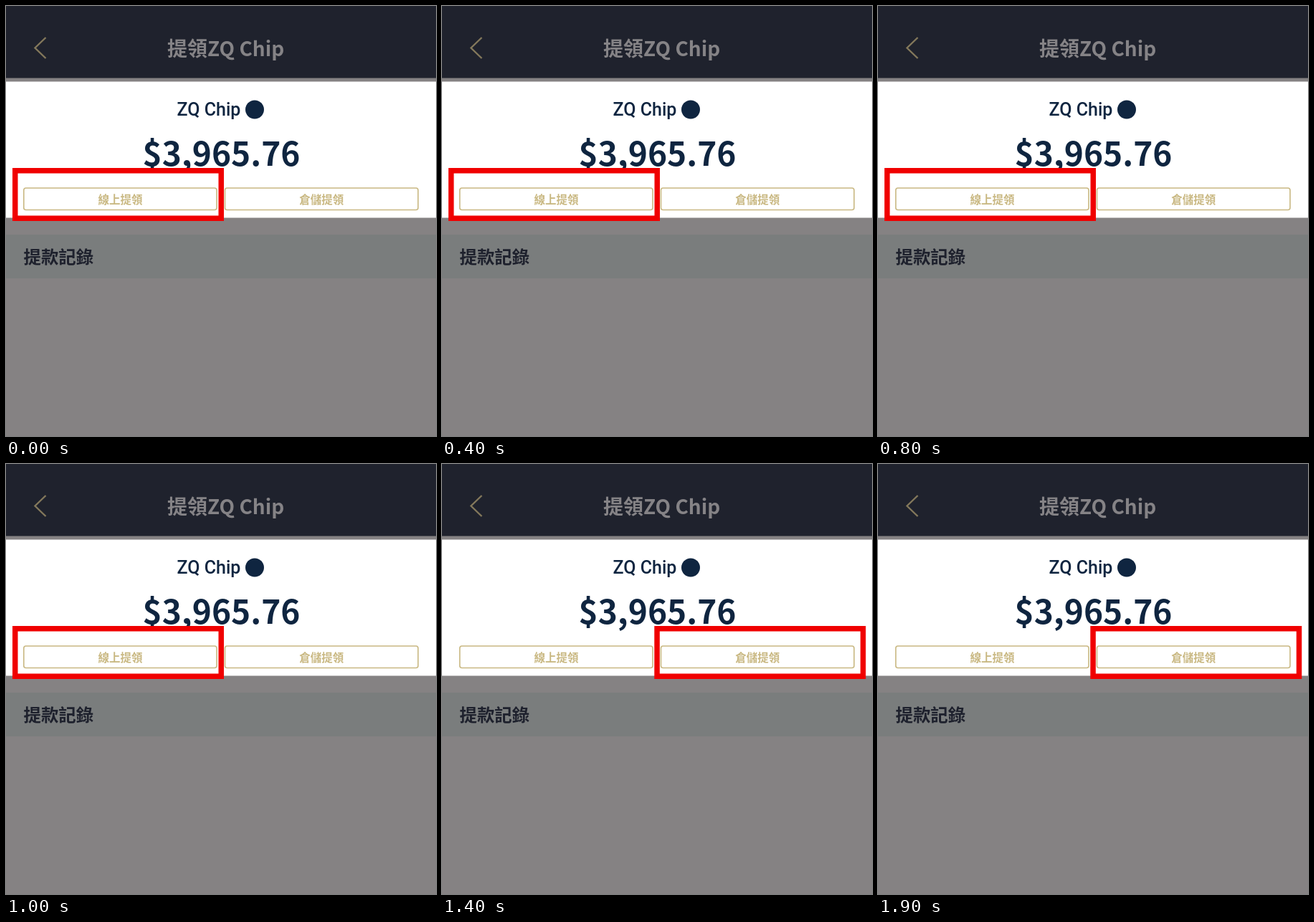
Recreate the animation shown at these times as an HTML page with a canvas. Size 600x600 px, loop 2000 ms.

```html
<!DOCTYPE html>
<html lang="zh-Hant">
<head>
<meta charset="utf-8">
<title>提領</title>
<style>
  html, body { margin: 0; width: 100%; height: 100%; overflow: hidden; background: #858283; }
  canvas { display: block; width: 600px; height: 600px; }
</style>
</head>
<body>
<canvas id="stage" width="600" height="600"></canvas>
<script>
const ctx = document.getElementById('stage').getContext('2d');
const CJK = '"Noto Sans CJK TC", "Noto Sans CJK JP", "Noto Sans CJK", sans-serif';
const LOOP = 2000;
const SWITCH = 1100;
const NAVY = '#0f2540';
const GOLD = '#c9b882';

function box(y, height, color) {
  ctx.fillStyle = color;
  ctx.fillRect(0, y, 600, height);
}

function label(text, x, y, font, color, align = 'left') {
  ctx.font = font;
  ctx.fillStyle = color;
  ctx.textAlign = align;
  ctx.fillText(text, x, y);
}

function button(text, x, width) {
  ctx.strokeStyle = GOLD;
  ctx.lineWidth = 1.6;
  ctx.beginPath();
  ctx.roundRect(x, 254, width, 30.5, 3);
  ctx.stroke();
  label(text, x + width / 2, 275.5, `bold 15.5px ${CJK}`, GOLD, 'center');
}

function backArrow() {
  ctx.strokeStyle = '#83785b';
  ctx.lineWidth = 2.4;
  ctx.beginPath();
  ctx.moveTo(55.5, 44);
  ctx.lineTo(40.5, 58.5);
  ctx.lineTo(55.5, 73);
  ctx.stroke();
}

function drawPage() {
  box(0, 600, '#858283');
  box(0, 100.5, '#1f222d');
  box(105.5, 190, '#ffffff');
  box(319, 61, '#7a7d7d');

  backArrow();
  label('提領ZQ Chip', 225, 69.5, `bold 28px ${CJK}`, '#858386');

  label('ZQ Chip', 238.5, 153, '500 25px Roboto, sans-serif', NAVY);
  ctx.fillStyle = NAVY;
  ctx.beginPath();
  ctx.arc(347, 144.5, 13, 0, Math.PI * 2);
  ctx.fill();

  label('$3,965.76', 300.5, 223, `bold 46px ${CJK}`, NAVY, 'center');
  button('線上提領', 24.8, 269.2);
  button('倉儲提領', 305.5, 269.5);
  label('提款記錄', 24.5, 359.3, `bold 24.4px ${CJK}`, '#1e212d');
}

function highlight(x) {
  ctx.strokeStyle = '#f00000';
  ctx.lineWidth = 7.5;
  ctx.strokeRect(x + 3.75, 229.75, 287.5, 66.5);
}

function frame(now) {
  drawPage();
  highlight(now % LOOP < SWITCH ? 9 : 296.3);
  requestAnimationFrame(frame);
}

frame(0);
</script>
</body>
</html>
```
